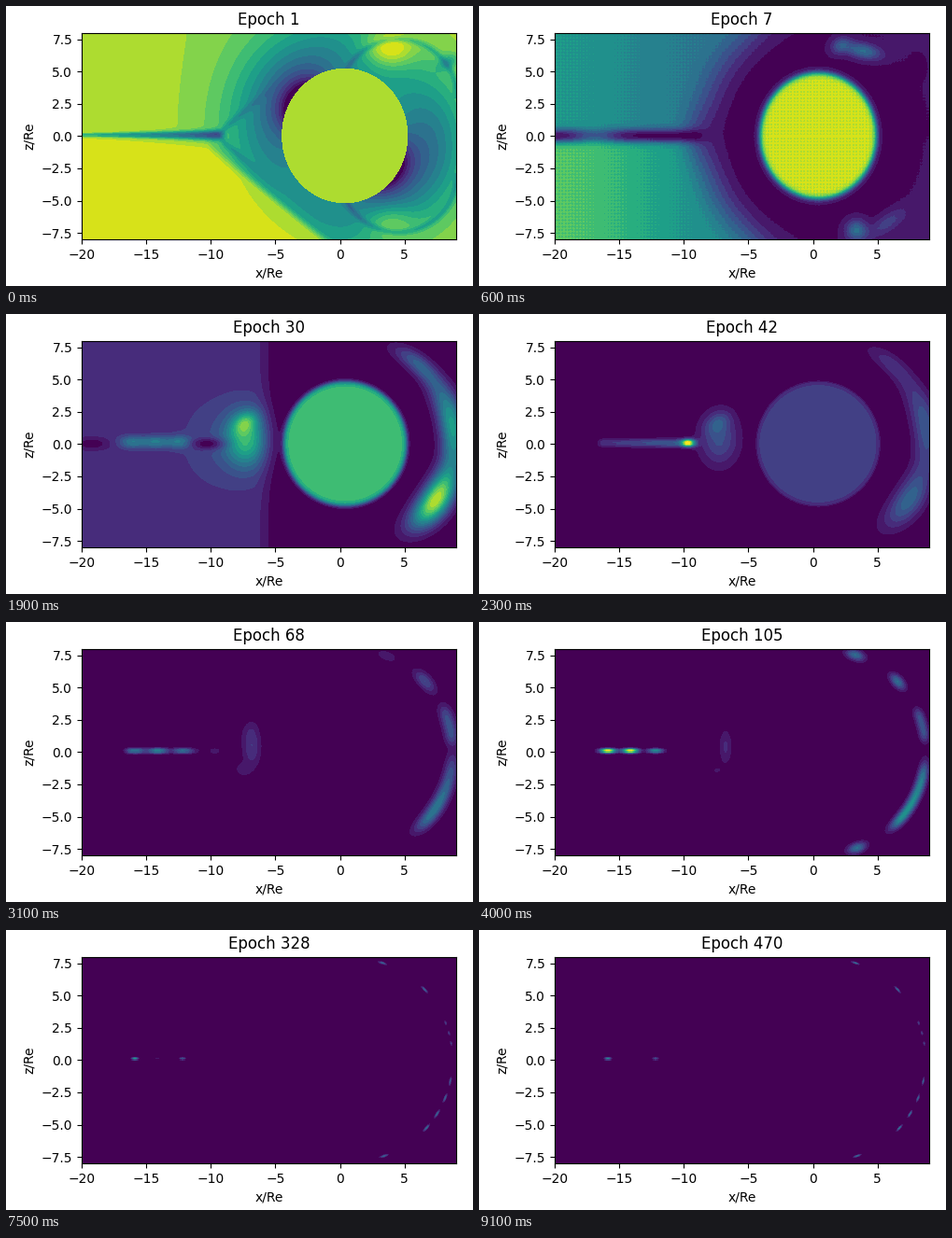
Write a matplotlib script that moves like this. It is 500x300 px and loops after 9.2 s.

```python
import matplotlib.pyplot as plt
import numpy as np
from matplotlib.animation import FuncAnimation

WIDTH, HEIGHT, FRAMES, INTERVAL = 500, 300, 92, 100
LEFT, TOP, AX_W, AX_H = 81, 28.8, 401, 221.2
AXIS_Y = 139.3

# Fields live on stage pixels, y pointing down.
X, Y = np.meshgrid(np.arange(AX_W) + LEFT + .5, np.arange(221) + TOP + .5)
RHO = np.hypot((X - 362.7) / 67.5, (Y - AXIS_Y) / 71.8)
RIM_R = np.hypot(X - 369.5, Y - AXIS_Y)
RIM_ANGLE = np.degrees(np.arctan2(Y - AXIS_Y, X - 369.5))


def ramp(v, lo, hi):
    t = np.clip((v - lo) / (hi - lo), 0, 1)
    return t * t * (3 - 2 * t)


def bell(v, width):
    return np.exp(-.5 * (v / width) ** 2)


def blob(x, y, sx, sy, angle=0):
    c, s = np.cos(np.radians(angle)), np.sin(np.radians(angle))
    return bell((X - x) * c + (Y - y) * s, sx) * bell((Y - y) * c - (X - x) * s, sy)


def arc(angle, spread, width, r=108.5):
    """Piece of the round rim on the right, angles in degrees."""
    return bell(RIM_ANGLE - angle, spread) * bell(RIM_R - r, width)


def disc(a, b, soft):
    rho = np.hypot((X - 363.2) / a, (Y - AXIS_Y) / b)
    return 1 / (1 + np.exp(np.clip((rho - 1) / soft, -40, 40)))


def rim(upper, lower):
    return (.5 * upper * arc(-50, 11, 7, 111) + upper * arc(-10, 18, 10, 110)
            + lower * arc(34, 13, 11))


def head(gain):
    return gain * (blob(257, 134, 15, 20) + .6 * blob(256, 117, 10, 7, -35))


def first_field():
    gap = np.maximum(RHO - 1, 0)
    axis = np.cos(np.arctan2(Y - AXIS_Y, X - 362.7) - np.radians(35.5)) ** 2
    edge = 144 + .03 * (X - LEFT) + .78 * np.maximum(X - 215, 0)
    lower = ramp(Y - edge, -8, 8)
    f = .87 - .07 * ramp(X, 100, 260) * (1 - ramp(X, 330, 420))
    f += (.92 - f) * lower
    wide = (.3 + .15 * axis) * np.exp(-(gap / .85) ** 2)
    f -= wide * (1 - .75 * lower) + .45 * axis ** 4 * np.exp(-gap / .2)
    f -= .15 * blob(465, 145, 25, 50)
    for side, glow in ((-1, .3), 1 * (1,) + (.2,)):
        y = AXIS_Y + side * AXIS_Y / 3.5
        ring = bell(np.hypot(X - 420, Y - y) - 63, 2.2)
        f -= .13 * ring * ((Y - y) * side > 0)
        f += glow * blob(410, AXIS_Y + side * 92, 18, 13)
        fork = (Y - AXIS_Y) * side - 4 - .85 * (X - 230)
        f -= .12 * bell(fork, 3.5) * ramp(X, 225, 235) * (1 - ramp(X, 240, 300))
    f -= .2 * blob(473, 61, 8, 5, -30)
    grow = np.clip((X - LEFT) / 145, 0, 1)
    f -= (.25 + .25 * grow) * bell(Y - 138.5, 1 + 2.2 * grow) * (1 - ramp(X, 224, 238))
    return np.where(RHO < 1, .88, np.clip(f, 0, .935))


def dark_ring_field():
    side = .53 - .13 * ramp(X, 81, 250)
    side += (.18 - .1 * ramp(X, 100, 290)) * ramp(Y, 136, 150)
    side *= 1 - .8 * ramp(X, 280, 360)
    f = .04 + (side - .04) * ramp(RHO - .15 * blob(235, AXIS_Y, 20, 20), 1.3, 2.3)
    tail = (1 - .5 * blob(125, AXIS_Y, 18, 40)) * (1 - ramp(X, 230, 255))
    f *= 1 - .92 * tail * bell(Y - AXIS_Y, 5)
    f += .32 * blob(411, 49, 14, 6, 12) + .2 * blob(387, 43, 8, 6, -35)
    f += .32 * blob(404, 240, 8, 8) + .15 * blob(437, 232, 16, 6, -35)
    f *= 1 - .8 * blob(470, 65, 6, 9)
    ball = disc(62.3, 67, .027)
    f = f * (1 - ball) + .895 * ball
    weave = np.cos(2 * np.pi * X / 3.5) + np.cos(2 * np.pi * Y / 3.5)
    return np.clip(f * (1 + .02 * weave), 0, 1)


def crescent_field():
    f = .14 * (1 - ramp(X, 264, 294))
    f += .1 * blob(236, 138, 32, 33) + head(.45)
    f += sum(.26 * blob(x, 137.5, 10, 4.5) for x in (135, 160, 186))
    for x in (92, 215):
        f *= 1 - .9 * blob(x, AXIS_Y, 12, 4)
    f += rim(.55, .85)
    ball = disc(65.8, 66, .023)
    return np.clip(f * (1 - ball) + .67 * ball, 0, 1)


def bright_knot_field():
    f = .18 * disc(66, 66.3, .015) + head(.25) + rim(.28, .32)
    grow = ramp(X, 120, 225)
    f += (.16 + .14 * grow) * bell(Y - 138.5, 3) * ramp(X, 122, 134) * (1 - ramp(X, 225, 240))
    return np.clip(f + .75 * blob(223.5, 138.5, 4.5, 2.3), 0, 1)


def peaks(tail_gains, tail_spread, tail_width, gain, spread, width):
    """The lasting peaks: three on the tail, the others round the rim."""
    f = sum(g * blob(x, 138.3, tail_spread, tail_width)
            for g, x in zip(tail_gains, (138, 162, 189)))
    for angle in (-72, -43.5, 71):
        f += gain * arc(angle, .6 * spread + .6, width)
    for angle in range(-21, -8, 6):
        f += .55 * gain * arc(angle, .6 * spread, width)
    for angle in range(12, 43, 10):
        f += gain * (.75 + angle / 120) * arc(angle, spread, width)
    return np.clip(f, 0, 1)


def clump_field():
    f = peaks((1, 1, .5), 6, 1.5, .36, 5.5, 4)
    return f + .13 * blob(264, 134, 5, 13) + .06 * blob(254, 159, 6, 5)


KEYS = [(0, first_field()), (6, dark_ring_field()), (19, crescent_field()),
        (23, bright_knot_field()), (40, clump_field()),
        (59, peaks((.85, .5, .4), 7, .75, .22, 5.5, 1.9)),
        (80, peaks((.5, .04, .27), 2.2, .8, .37, 1.4, .8))]
SHARPEN_FROM, FLOOR = 23, .004


def field_at(i):
    i = min(i, KEYS[-1][0])
    for (t0, a), (t1, b) in zip(KEYS, KEYS[1:]):
        if i <= t1:
            u = (i - t0) / (t1 - t0)
            if t0 < SHARPEN_FROM:
                return a * (1 - u) + b * u
            # A geometric blend narrows the peaks instead of cross-fading them.
            return (a + FLOOR) ** (1 - u) * (b + FLOOR) ** u - FLOOR


def epoch_at(i):
    return sum(1 + k // 10 for k in range(i + 1))


plt.rcParams["font.family"] = "DejaVu Sans"
fig = plt.figure(figsize=(WIDTH / 100, HEIGHT / 100), dpi=100)
ax = fig.add_axes([LEFT / WIDTH, 1 - (TOP + AX_H) / HEIGHT, AX_W / WIDTH, AX_H / HEIGHT])
image = ax.imshow(KEYS[0][1], cmap=plt.get_cmap("viridis", 17), vmin=0, vmax=1,
                  extent=(-20, 9, -8, 8), aspect="auto", interpolation="nearest")
ax.set_xticks(range(-20, 6, 5))
ax.set_yticks(np.arange(-7.5, 8, 2.5))
ax.set_xlabel("x/Re")
ax.set_ylabel("z/Re")
title = ax.set_title("Epoch 1")


def draw(i):
    image.set_data(field_at(i))
    title.set_text(f"Epoch {epoch_at(i)}")
    return image, title


anim = FuncAnimation(fig, draw, frames=FRAMES, interval=INTERVAL, repeat=True, repeat_delay=0)
plt.show()
```
